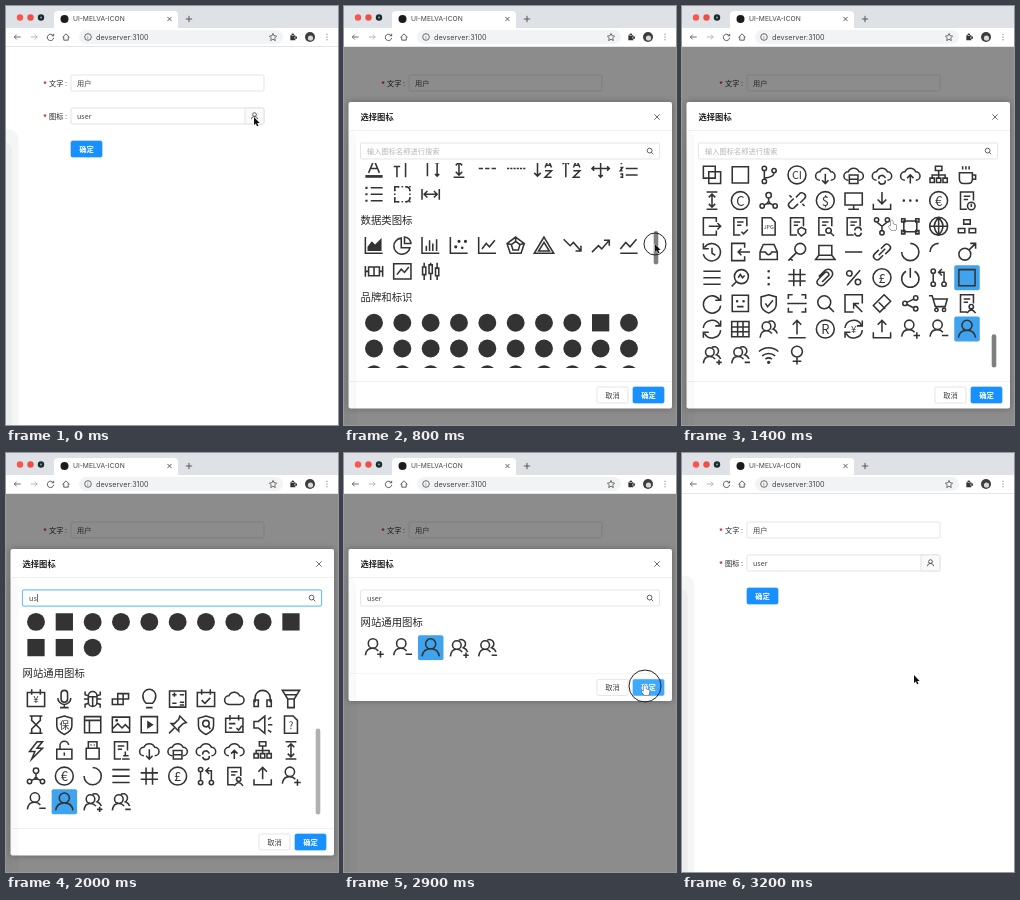
These frames come from a looping animation (332 px wide and 419 px high, 3300 ms). An HTML page with a canvas:

```html
<!DOCTYPE html>
<html lang="zh">
<head>
<meta charset="utf-8">
<title>Icon picker</title>
<style>
html, body { margin: 0; width: 100%; height: 100%; overflow: hidden; background: #fff; }
canvas { display: block; width: 332px; height: 419px; }
</style>
</head>
<body>
<canvas id="stage"></canvas>
<script>
const W = 332, H = 419, LOOP = 3300, PITCH = 25.7, TOP = 157, VIEW = 205;
const BLUE = '#1890ff', INK = '#333';
const canvas = document.getElementById('stage'), c = canvas.getContext('2d');
const dpr = window.devicePixelRatio || 1;
canvas.width = W * dpr;
canvas.height = H * dpr;

// Path helpers: circle, box, dotted outline with optional inner cross
const o = (x, y, r) => `M${x - r} ${y}a${r} ${r} 0 1 0 ${2 * r} 0a${r} ${r} 0 1 0 ${-2 * r} 0z`;
const b = (x, y, w, h = w) => `M${x} ${y}h${w}v${h}h${-w}z`;
const dots = cross => {
  let s = '';
  for (let x = -7; x <= 7; x += 3.5)
    for (let y = -7; y <= 7; y += 3.5)
      if (Math.abs(x) == 7 || Math.abs(y) == 7 || (cross && (!x || !y))) s += b(x - .7, y - .7, 1.4);
  return s;
};
const ring = o(0, 0, 8.3), sq = b(-7.5, -7.5, 15), grid = '!' + dots(true), edge = '!' + dots(false);
const cloud = 'M-5 5A4 4 0 0 1-5-3A5.5 5.5 0 0 1 5-3A4 4 0 0 1 5 5';
const page = 'M0 8H-6V-8H6V0M-3-4H3M-3-1H1';
const shield = 'M0-8L7-6V1Q7 6 0 9Q-7 6-7 1V-6z';
const cal = b(-8, -6, 16, 13) + 'M-4-9V-4M4-9V-4';
const chain = 'M-1-3L3-7Q5-8 7-6T7-2L3 2M1 3L-3 7Q-5 8-7 6T-7 2L-3-2';
const axes = 'M-8-8V7H8';
const one = o(-1, -4, 4.3) + 'M-8 7Q-7 0-1 .5Q2 .5 4 3';
const two = o(-2, -2.5, 4) + 'M-8 8Q-7 1-2 1.5Q1 1.5 3 4M0-7A4 4 0 1 1 4 0Q7 1 8 4';
const sync = 'M-8-1A8 8 0 0 1 7-4M8-8V-3H3M8 1A8 8 0 0 1-7 4M-8 8V3H-3';
const fold = 'M-8-7H8M-8 7H8M-1-2.5H8M-1 2.5H8';

// Each icon: stroked path ! filled path ! glyph
const icons = {
  disc: '!' + o(0, 0, 8.3), slab: '!' + b(-8, -8, 16),
  step: '!M-5-6h2V6h-2zM5-6V6L-3 0z', fast: '!M-8-6h1.5V6H-8zM0-6V6L-6 0zM7-6V6L1 0z',
  shrink: 'M8-8L2-2M2-6.5V-2H6.5M-8 8L-2 2M-2 6.5V2H-6.5', expand: 'M8-8L2-2M3-8H8V-3M-8 8L-2 2M-3 8H-8V3',
  chev: 'M-7-4L0 4 7-4', caret: '!M-6 3.5H6L0-3.5z', chevC: ring + 'M-4 2L0-2.5 4 2', chevS: sq + 'M-3.5 2L0-2 3.5 2',
  dbl: 'M-6-7L0 0-6 7M1-7L7 0 1 7', vert: 'M-5-7L2 0-5 7M6-8V8',
  edgeTop: 'M-8-7H8M0 8V-3M-3 0L0-3 3 0', middle: 'M-8 0H8M0-9V-3M-3-5L0-2.5 3-5M0 9V3M-3 5L0 2.5 3 5',
  skip: '!M-6-5V5L0 0zM1-5V5L7 0z', back: 'M-7-5H6V6H-7M-4-8L-7-5-4-2', enter: 'M7-8V4H-7M-4 1L-7 4-4 7',
  loop: 'M-7 2V-5H5M3-8L6-5 3-2M7-2V5H-5M-3 8L-6 5-3 2', swap: 'M-8-2H8L4-6M8 2H-8L-4 6',
  swapL: 'M8 1H-8L-4-3', swapR: 'M-8 1H8L4-3', arrow: 'M0 8V-8M-6-2L0-8 6-2', play: ring + 'M-2.5-4V4L4 0z',
  login: 'M-5-6A8 8 0 1 1-5 6M-9 0H2M-1-3L2 0-1 3', logout: 'M5-6A8 8 0 1 0 5 6M-2 0H9M6-3L9 0 6 3',
  fold: fold + '!M-8 0L-4-3V3z', unfold: fold + '!M-4 0L-8-3V3z',
  bEdge: 'M-8 7H8' + grid, bMid: 'M-8 0H8' + grid, bCross: 'M-8 0H8M0-8V8' + grid, bOuter: b(-7, -7, 14) + grid,
  picC: 'M-8-7H8M-8 7H8' + b(-5, -3, 10, 6), picL: 'M-8-7H8M-8 7H8M4-2H8M4 2H8' + b(-8, -3, 9, 6),
  radius: 'M-7-7V0A7 7 0 0 0 0 7H7' + edge,
  corners: 'M-7-3V-7H-3M3-7Q7-7 7-3M7 3Q7 7 3 7M-3 7H-7V3' + edge,
  full: 'M-7-7L-2-2M7-7L2-2M-7 7L-2 2M7 7L2 2!M-8-8h5L-8-3zM8-8V-3L3-8zM8 8H3L8 3zM-8 8V3L-3 8z',
  unfull: 'M-8-8L-3-3M8-8L3-3M-8 8L-3 3M8 8L3 3!M-2-2v-5l-5 5zM2-2h5L2-7zM2 2v5L7 2zM-2 2h-5l5 5z',
  fontA: 'M-5 4L0-8 5 4M-3 0H3!M-8 6H8V8.5H-8z', fontT: 'M-2-7H8M3-7V8M-8-2H-2M-5-2V8',
  lineH: 'M-8-7H2M-3-7V7M6-7V7M4-5L6-7 8-5M4 5L6 7 8 5', colH: 'M-5-8H5M-5 8H5M0-6V6M-3-3L0-6 3-3M-3 3L0 6 3 3',
  dash: 'M-8 0h4M-2 0h4M4 0h4', dash2: 'M-8 0h2M-5 0h2M-2 0h2M1 0h2M4 0h2M7 0h2',
  sortA: 'M-6-8V7M-9 4L-6 7-3 4M1-1L4-8 7-1M2-3H6M1 2H7L1 8H7', sortD: 'M-6 8V-7M-9-4L-6-7-3-4M1-1L4-8 7-1M2-3H6M1 2H7L1 8H7',
  drag: 'M-8 0H8M0-8V8M-6-2L-8 0-6 2M6-2L8 0 6 2M-2-6L0-8 2-6M-2 6L0 8 2 6',
  ol: 'M-3-6H8M-3 0H8M-3 6H8M-7-8V-4M-8-1H-6L-8 2H-6M-8 5H-6V8H-8', ul: 'M-3-6H8M-3 0H8M-3 6H8!' + b(-8, -7, 2) + b(-8, -1, 2) + b(-8, 5, 2),
  area: axes + '!M-6 5V1L-2-4 1-1 7-7V5z', pie: 'M-1-7A7.5 7.5 0 1 0 7 2H-1zM2-8A7 7 0 0 1 8-2H2z',
  bars: axes + 'M-4 5V0M-1 5V-5M2 5V-2M5.5 5V-6', scatter: axes + '!' + o(-3, 1, 1.5) + o(0, -4, 1.5) + o(3, 2, 1.2) + o(6, -4, 1.5),
  line: axes + 'M-5 3L-1-2 2 1 7-5', radar: 'M0-8L8-2 5 7H-5L-8-2zM0-4L4-1 2.5 4H-2.5L-4-1zM0-8V-4M8-2L4-1M-8-2L-4-1',
  heat: 'M0-8L9 7H-9zM0-3L5 5H-5z', fall: 'M-8-6L-2 0 1-3 8 5M8 0V5H3', rise: 'M-8 6L-2 0 1 3 8-5M8 0V-5H3',
  stock: 'M-8 7H8M-8 3L-3-3 1 1 7-6', boxplot: 'M-8-5V5M8-5V5M-8 0H-5M5 0H8M0-4V4' + b(-5, -4, 10, 8), fund: b(-8, -7, 16, 14) + 'M-5 3L-1-2 2 1 6-4',
  sliders: 'M-6-8V-4M-6 3V8M0-8v2M0 2V8M6-8v5M6 4V8' + b(-7.5, -4, 3, 7) + b(-1.5, -6, 3, 8) + b(4.5, -3, 3, 7),
  union: b(-8, -8, 11) + b(-3, -3, 11), box: sq, branch: o(-4, -6, 2) + o(-4, 6, 2) + o(5, -4, 2) + 'M-4-4V4M5-2Q5 2-4 3',
  cloud: cloud + 'z', cloudDown: cloud + 'M0-1V8M-3 5L0 8 3 5', cloudUp: cloud + 'M0 8V0M-3 3L0 0 3 3',
  cloudBox: cloud + b(-4, 0, 8, 4) + b(-4, 4, 8, 4), cloudSync: cloud + 'M-3 4A3 3 0 0 1 3 3M3 5A3 3 0 0 1-3 6',
  cluster: b(-3, -8, 6, 4) + b(-8, 3, 4) + b(-2, 3, 4) + b(4, 3, 4) + 'M0-4V3M-6 3V0H6V3',
  coffee: 'M-7-2H5V4Q5 8 1 8H-3Q-7 8-7 4zM5 0H8V4H5M-4-8V-5M-1-8V-5M2-8V-5',
  deploy: o(0, -5, 2.5) + o(-6, 5, 2) + o(6, 5, 2) + o(0, 2, 1) + 'M0-2V1M-4 4L-1 2.5M4 4L1 2.5',
  link: chain + 'M-3 3L3-3', unlink: chain + 'M-7-5L-5-3M7 5L5 3', desktop: b(-8, -7, 16, 11) + 'M-5 8H5M0 4V8',
  download: 'M0-8V3M-4-1L0 3 4-1M-8 3V8H8V3', upload: 'M0 3V-8M-4-4L0-8 4-4M-8 3V8H8V3',
  more: '!' + o(-6, 0, 1.2) + o(0, 0, 1.2) + o(6, 0, 1.2),
  fileBad: page + o(4, 5, 3.5) + 'M4 3V6', fileDone: page + 'M1 5L3 7 7 3', fileJpg: 'M-6 8V-8H2L6-4V8z!!JPG', fileAsk: 'M-6 8V-8H2L6-4V8z!!?',
  fileSafe: page + 'M4 1L8 3V6L4 9 1 6V3z', fileFind: page + o(3, 4, 2.5) + 'M5 6L8 9', fileSync: page + 'M1 4A3 3 0 0 1 7 4M7 6A3 3 0 0 1 1 6',
  resume: page + o(4, 3, 2) + 'M0 9Q4 3 8 9', audit: page + 'M1 8H8M2 5H7M4 1V5',
  out: 'M4-4V-8H-8V8H4V4M-3 0H8M5-3L8 0 5 3', in: 'M4-4V-8H-8V8H4V4M9 0H-2M1-3L-2 0 1 3',
  fork: o(-5, -6, 2) + o(5, -6, 2) + o(0, 6, 2) + 'M-5-4L0 0 5-4M0 0V4', gate: b(-6, -5, 12, 10) + b(-8, -7, 3) + b(5, -7, 3) + b(-8, 4, 3) + b(5, 4, 3),
  globe: ring + 'M-8 0H8M0-8V8M0-8Q-8 0 0 8Q8 0 0-8', gold: b(-3, -6, 6, 4) + b(-8, 2, 6, 4) + b(2, 2, 6, 4),
  history: 'M-7-4A8 8 0 1 1-8 2M-8-8V-3H-3M0-4V1L3 3', inbox: 'M-8 0L-5-7H5L8 0V7H-8zM-8 0H-3Q0 5 3 0H8',
  key: o(3, -3, 5) + 'M-1 1L-8 8M-6 6L-4 8', laptop: b(-6, -6, 12, 9) + 'M-6 3L-9 7H9L6 3', minus: 'M-8 0H8',
  loading: 'M0-8A8 8 0 1 1-8 0', quarter: 'M-8 0A8 8 0 0 1 0-8', man: o(-2, 2, 5.5) + 'M2-2L8-8M3-8H8V-3', woman: o(0, -3, 5) + 'M0 2V9M-4 6H4',
  menu: 'M-8-6H8M-8 0H8M-8 6H8', monitor: o(1, -1, 6.5) + 'M-4 4L-8 8M-2 0L0-3 2 0 4-2', hash: 'M-3-8V8M3-8V8M-8-3H8M-8 3H8',
  clip: 'M-6-1L0-7Q4-9 6-6T5 0L-2 7Q-5 8-7 6T-6 1L0-5Q2-6 3-4T2-1L-3 4', percent: o(-4, -4, 2.5) + o(4, 4, 2.5) + 'M6-7L-6 7',
  power: 'M-4-6A8 8 0 1 0 4-6M0-9V0', pull: o(-5, -6, 2) + o(-5, 6, 2) + o(5, 6, 2) + 'M-5-4V4M5 4V-5H1M3-8L0-5 3-2',
  reload: 'M7-3A8 8 0 1 0 8 2M8-8V-3H3', robot: sq + 'M-3 3H3!' + o(-3, -2, 1.2) + o(3, -2, 1.2), safe: shield + 'M-3 0L-1 3 4-3',
  scan: 'M-8-4V-8H-4M4-8H8V-4M8 4V8H4M-4 8H-8V4M-9 0H9', search: o(-1, -1, 6) + 'M3 3L8 8', select: 'M8 0V-8H-8V8H0M8 8L0 0M0 5V0H5',
  shake: 'M2-8L8-2-2 8-8 2zM-3-1L3 5', share: o(-5, 0, 2) + o(5, -5, 2) + o(5, 5, 2) + 'M-3-1L3-4M-3 1L3 4',
  cart: 'M-9-7H-6L-3 3H6L8-4H-5' + o(-2, 6, 1.5) + o(5, 6, 1.5), sync, trade: sync + '!!¥',
  table: b(-8, -7, 16, 14) + 'M-8-2H8M-8 2.5H8M-2.5-7V7M2.5-7V7', toTop: 'M-8 8H8M0 5V-8M-4-4L0-8 4-4',
  user: o(0, -3.5, 4.7) + 'M-8 8Q-7 1 0 1T8 8', userAdd: one + 'M3 6H9M6 3V9', userDel: one + 'M3 6H9',
  team: two, teamAdd: two + 'M4 7H9M6.5 4.5V9.5', teamDel: two + 'M4 7H9',
  wifi: 'M-9-3A13 13 0 0 1 9-3M-6 1A9 9 0 0 1 6 1M-3 4A5 5 0 0 1 3 4!' + o(0, 7, 1.5),
  book: cal + '!!¥', mic: 'M-3-5A3 3 0 0 1 3-5V0A3 3 0 0 1-3 0zM-6-1A6 6 0 0 0 6-1M0 5V8M-4 8H4',
  bug: 'M-4-3A4 4 0 0 1 4-3V3A4 4 0 0 1-4 3zM-4-2H4M0-2V7M-8 0H-4M4 0H8M-7-7V-4L-4-3M7-7V-4L4-3M-7 8V5L-4 4M7 8V5L4 4',
  build: b(-8, 0, 5) + b(-3, 0, 5) + b(-3, -5, 5) + b(2, -5, 5), bulb: 'M-3 4Q-6 1-6-3A6 6 0 0 1 6-3Q6 1 3 4zM-3 8H3',
  calc: sq + 'M-5-4H-1M-3-6V-2M2-4H6M-5 4H-1M2 3H6M2 5.5H6', calDone: cal + 'M-4 1L-1 4 4-1', plan: cal + 'M-5-1H1M-5 3H-2M2 3L4 5 7 1',
  head: 'M-7 3V-1A7 7 0 0 1 7-1V3' + b(-8, 1, 4, 6) + b(4, 1, 4, 6), funnel: 'M-8-8H8L3 0V8H-3V0zM-6-4H6M-3 0H3',
  glass: 'M-6-8H6M-6 8H6M-4-8V-4L4 4V8M4-8V-4L-4 4V8', insure: shield + '!!保', layout: sq + 'M-8-4H8M-3-4V8',
  picture: b(-8, -7, 16, 14) + 'M-8 4L-3-1 1 3 4 0 8 4!' + o(-4, -4, 1.3), playS: sq + '!M-2-4V4L4 0z',
  pin: 'M2-8L8-2 5-1 1 3V6L-6-1H-3L1-5zM-3 3L-8 8', shieldFind: shield + o(0, -1, 3) + 'M2 1L4 4',
  sound: 'M-8-3H-4L2-8V8L-4 3H-8zM5 0H9M5-5L8-7M5 5L8 7', bolt: 'M1-8L-6 1H-1L-4 8 6-2H1L6-8z',
  unlock: b(-7, -1, 14, 9) + 'M-4-1V-4A4 4 0 0 1 4-5M0 2V5', usb: 'M-4-2V-8H4V-2M-6-2H6V8H-6zM-2-5H-1M1-5H2',
  home: 'M-8 1L0-7 8 1M-5-1V7H5V-1', star: 'M0-8L2-3 8-2 4 2 5 8 0 5-5 8-4 2-8-2-2-3z', close: 'M-6-6L6 6M6-6L-6 6', plus: 'M-7 0H7M0-7V7',
  puzzle: '!' + b(-7, -4, 11) + o(-1.5, -5, 3) + o(5, 1.5, 3)
};
const list = s => s.split(' ');
const fill = (n, pool) => Array.from({ length: n }, (_, i) => pool[i * 7 % pool.length]);

const direction = list('step step@180 fast fast@180 shrink expand chev chev@180 chev@90 chev@270 ' +
  'caret caret@180 caret@270 caret@90 chevC chevC@180 chevC@270 chevC@90 dbl dbl@180 ' +
  'vert vert@180 edgeTop middle edgeTop@180 skip skip@180 back enter loop ' +
  'swap swapL swapR arrow arrow@180 arrow@270 arrow@90 play chevS chevS@180 ' +
  'chevS@270 chevS@90 login logout fold unfold bEdge bMid bCross bOuter ' +
  'bEdge@90 bEdge@270 bEdge@180 bMid@90 picC picL picL@180 radius radius@270 radius@90 radius@180 full unfull');
const tips = list('(? (+ (| (- (i (! (× (✓ [+ [- [× [✓');
const edits = list('fontA fontT lineH colH dash dash2 sortA sortD drag ol ul corners colH@90');
const data = list('area pie bars scatter line radar heat fall rise stock boxplot fund sliders');
const common = list('book mic bug build bulb calc calDone cloud head funnel ' +
  'glass insure layout picture playS pin shieldFind plan sound fileAsk ' +
  'bolt unlock usb audit cloudDown cloudBox cloudSync cloudUp cluster colH ' +
  'deploy (€ loading menu hash (£ pull resume upload userAdd userDel user teamAdd teamDel');
const tail = list('union box branch (CI cloudDown cloudBox cloudSync cloudUp cluster coffee ' +
  'colH (C deploy unlink ($ desktop download more (€ fileBad ' +
  'out fileDone fileJpg fileSafe fileFind fileSync fork gate globe gold ' +
  'history in inbox key laptop minus link loading quarter man ' +
  'menu monitor more@90 hash clip percent (£ power pull box ' +
  'reload robot safe scan search select shake share cart resume ' +
  'sync table team toTop (R trade upload userAdd userDel user teamAdd teamDel wifi woman');
const brands = fill(42, ['disc']);
brands[8] = 'slab';
const brandsU = fill(13, ['disc']);
for (const i of [1, 9, 10, 11]) brandsU[i] = 'slab';

const titles = ['方向性图标', '提示建议性图标', '编辑类图标', '数据类图标', '品牌和标识', '网站通用图标'];
const layout = groups => groups.flatMap((g, i) => {
  const rows = g.length ? [titles[i]] : [];
  for (let k = 0; k < g.length; k += 10) rows.push(g.slice(k, k + 10));
  return rows;
});
const pool = common.slice(0, 40);
const allRows = layout([direction, fill(26, tips), [...fill(30, tail.slice(0, 40)), ...edits], data, brands, [...fill(130, pool), ...tail]]);
const uRows = layout([fill(30, direction), fill(8, tips), fill(8, edits), fill(3, data), brandsU, common]);
const userRows = layout([[], [], [], [], [], list('userAdd userDel user teamAdd teamDel')]);

const paths = {};
const path = d => paths[d] ||= new Path2D(d);

function text(s, x, y, size, color = INK, align = 'left', weight = 400, face = '"Noto Sans CJK SC", "Noto Sans CJK"') {
  c.font = `${weight} ${size}px ${face}, sans-serif`;
  c.fillStyle = color;
  c.textAlign = align;
  c.fillText(s, x, y + size * .37);
}
function rect(x, y, w, h, r, fillColor, line) {
  c.beginPath();
  c.roundRect(x, y, w, h, r);
  if (fillColor) { c.fillStyle = fillColor; c.fill(); }
  if (line) { c.strokeStyle = line; c.lineWidth = .7; c.stroke(); }
}
const disc = (x, y, r, color) => rect(x - r, y - r, 2 * r, 2 * r, r, color);

function icon(token, x, y, scale = 1.08, color = INK) {
  const [name, turn = 0] = token.split('@');
  const frame = { '(': ring, '[': sq }[name[0]];
  const [line, solid, glyph] = frame ? [frame, '', name.slice(1)] : icons[name].split('!');
  c.save();
  c.translate(x, y);
  c.scale(scale, scale);
  c.rotate(turn * Math.PI / 180);
  c.strokeStyle = c.fillStyle = color;
  c.lineWidth = (scale < 1 ? .85 : 1.55) / scale;
  if (line) c.stroke(path(line));
  if (solid) c.fill(path(solid));
  if (glyph) {
    const size = glyph.length > 2 ? 5 : glyph.length > 1 ? 10 : frame ? 12 : 9;
    text(glyph, 0, .2, size, color, 'center', 500);
  }
  c.restore();
}
function button(label, x, y, color) {
  rect(x, y, 31, 16, 1.5, color || '#fff', color || '#d9d9d9');
  text(label, x + 15.5, y + 8, 7.3, color ? '#fff' : '#444', 'center', color ? 700 : 400);
}

function browser() {
  rect(0, 0, W, 23, 0, '#dee1e6');
  disc(14, 11.5, 3.2, '#f9564f');
  disc(24.5, 11.5, 3.2, '#ee4f45');
  disc(35, 11.5, 3.2, '#1d2b2c');
  disc(35, 11.5, 1, '#79a88a');
  rect(48, 5, 124, 22, 4, '#fff');
  rect(0, 22, W, 19, 0, '#fff');
  rect(0, 40, W, .8, 0, '#dcdde0');
  disc(58.5, 13, 4, '#1c1c1e');
  text('UI-MELVA-ICON', 67, 13, 6.7, '#444', 'left', 400, 'Inter');
  icon('close', 163.5, 13, .35, '#444');
  icon('plus', 183, 13, .45, '#444');
  icon('arrow@270', 11.5, 31, .4, '#555');
  icon('arrow@90', 28, 31, .4, '#aaa');
  icon('reload', 44.5, 31, .4, '#444');
  icon('home', 60, 31, .45, '#444');
  rect(73, 24, 204, 14, 7, '#f1f3f4');
  icon('(i', 82, 31, .4, '#555');
  text('devserver:3100', 90, 31, 7.2, '#444', 'left', 400, 'Inter');
  icon('star', 267, 31, .45, '#555');
  icon('puzzle', 287.5, 31, .45, '#333');
  disc(304, 31, 5, '#3d3d3d');
  disc(304.5, 32, 2.6, '#d8d8d8');
  icon('more@90', 321, 31, .45, '#444');
}
function field(label, y, value) {
  text('*', 37, y + 1, 8, '#c8302f', 'left', 700);
  text(label + ' :', 43, y, 7.2, '#222');
  rect(65, y - 8, 193, 16, 1.5, '#fff', '#d9d9d9');
  text(value, 71, y, 7.2, '#444');
}
function form() {
  field('文字', 77, '用户');
  field('图标', 110, 'user');
  rect(239, 102, 19, 16, [0, 1.5, 1.5, 0], '#fafafa', '#d9d9d9');
  icon('user', 248.5, 110, .4, '#444');
  button('确定', 65, 135, BLUE);
}

function dialog(t, drag) {
  const query = t < 1900 ? '' : 'user'.slice(0, (t - 1800) / 100);
  const rows = t < 2000 ? allRows : t < 2100 ? uRows : userRows;
  const size = rows.length * PITCH, view = Math.min(VIEW, size - 1), foot = TOP + view + 13;
  const thumb = VIEW * VIEW / size, ratio = t >= 2000 ? 1 : drag;
  const scroll = Math.max(0, size - VIEW - .5) * ratio;
  const focus = t >= 1700 && t < 2900;

  c.shadowColor = 'rgba(0,0,0,.3)';
  c.shadowBlur = 6 * dpr;
  rect(4.5, 96, 323.5, foot + 27.5 - 96, 2, '#fff');
  c.shadowColor = 'transparent';
  text('选择图标', 16.5, 110.5, 8.3, '#222', 'left', 700);
  icon('close', 313, 111, .45, '#555');
  rect(4.5, 124, 323.5, .7, 0, '#ececec');
  if (focus) rect(15.7, 136.2, 300.6, 17.6, 2, '#b9dcfb');
  rect(16.5, 137, 299, 16, 1.5, '#fff', focus ? '#40a9ff' : '#d9d9d9');
  text(query || '输入图标名称进行搜索', 23, 145.3, 7.25, query ? '#444' : '#b5b5b5');
  if (focus && t < 2500) rect(query ? 23.5 + c.measureText(query).width : 22.5, 141, .7, 8, 0, '#333');
  icon('search', 306, 145, .4, '#444');

  c.save();
  c.beginPath();
  c.rect(5, TOP, 322, view);
  c.clip();
  rows.forEach((row, i) => {
    const y = 169 + i * PITCH - scroll;
    if (y < TOP - 14 || y > TOP + view + 14) return;
    if (typeof row == 'string') return text(row, 16.5, y, 10.4, '#262626');
    row.forEach((token, k) => {
      const x = 30 + k * 28.33;
      const hover = (t == 1300 || t == 1400) && k == 9 && Math.abs(y - 272) < 5;
      if (token == 'user' || hover) rect(x - 12.7, y - 12.5, 25.5, 25, 2, '#40a3ee');
      icon(token, x, y);
    });
  });
  c.restore();
  if (size > VIEW) rect(309.7, TOP + .5 + ratio * (VIEW - thumb - 1), 4.6, thumb, 2.3, t < 500 ? '#bcbcbc' : t < 1900 ? '#7f7f7f' : '#b0b0b0');

  rect(4.5, foot, 323.5, .7, 0, '#ececec');
  button('取消', 253, foot + 6);
  button('确定', 289, foot + 6, t >= 2800 ? '#40a9ff' : BLUE);
}

const track = [[0, 248, 111], [200, 228, 116], [400, 300, 166], [500, 311, 170], [800, 311, 238], [1200, 311, 329], [1300, 286, 272],
  [1400, 210, 215], [1600, 130, 146], [2500, 150, 160], [2800, 301, 233], [2900, 301, 233], [3000, 290, 231], [3200, 232, 222]];
function pointer(t) {
  const i = Math.max(1, track.findIndex(k => k[0] >= t));
  const [p, q] = [track[i - 1], track[i]], f = (t - p[0]) / (q[0] - p[0]);
  return [p[1] + f * (q[1] - p[1]), p[2] + f * (q[2] - p[2])];
}
const arrow = 'M0 0V8L1.8 6.4 3.1 9.3 4.5 8.7 3.2 5.9H5.7z';
const hand = 'M-1.5 0Q0-1.5 .8 0V3L4.5 4V7L3.5 9.5H-.5L-3.5 5.5Q-3 4-1.5 5.5z';
function cursor(t, x, y) {
  const press = t >= 500 && t <= 1200 ? 11 : t == 1700 ? 14 : t == 2900 ? 16 : 0;
  if (press) {
    c.beginPath();
    c.arc(x, y, press, 0, 7);
    c.strokeStyle = '#222';
    c.lineWidth = 1;
    c.stroke();
  }
  if (t >= 1900 && t < 2500) return;
  const pointing = (t >= 1300 && t < 1500) || (t >= 2800 && t < 3000);
  c.save();
  c.translate(x, y);
  c.fillStyle = pointing ? '#fff' : '#111';
  c.strokeStyle = pointing ? '#222' : '#fff';
  c.lineWidth = .8;
  const shape = path(pointing ? hand : arrow);
  c.stroke(shape);
  c.fill(shape);
  c.restore();
}

function draw(now) {
  const t = Math.floor(now % LOOP / 100) * 100;
  const [x, y] = pointer(t);
  c.setTransform(dpr, 0, 0, dpr, 0, 0);
  rect(0, 0, W, H, 0, '#fff');
  browser();
  form();
  const open = t == 0 || t > 3000 ? 0 : t == 100 || t == 3000 ? .5 : 1;
  if (open) {
    rect(0, 41, W, H - 41, 0, `rgba(0,0,0,${.45 * open})`);
    c.save();
    c.globalAlpha = open;
    if (open < 1) {
      c.translate(248, 112);
      c.scale(.8, .8);
      c.translate(-248, -112);
    }
    dialog(t, Math.min(1, Math.max(0, t - 500) / 757));
    c.restore();
  }
  // soft strip along the left window edge
  rect(-10, 123, 22.5, 310, 10, `rgba(20,25,35,${open ? .02 : .045})`);
  rect(-10, 136, 16, 300, 8, `rgba(20,25,35,${open ? .01 : .03})`);
  cursor(t, x, y);
  requestAnimationFrame(() => draw(performance.now() - start));
}
const start = performance.now();
draw(0);
</script>
</body>
</html>
```
